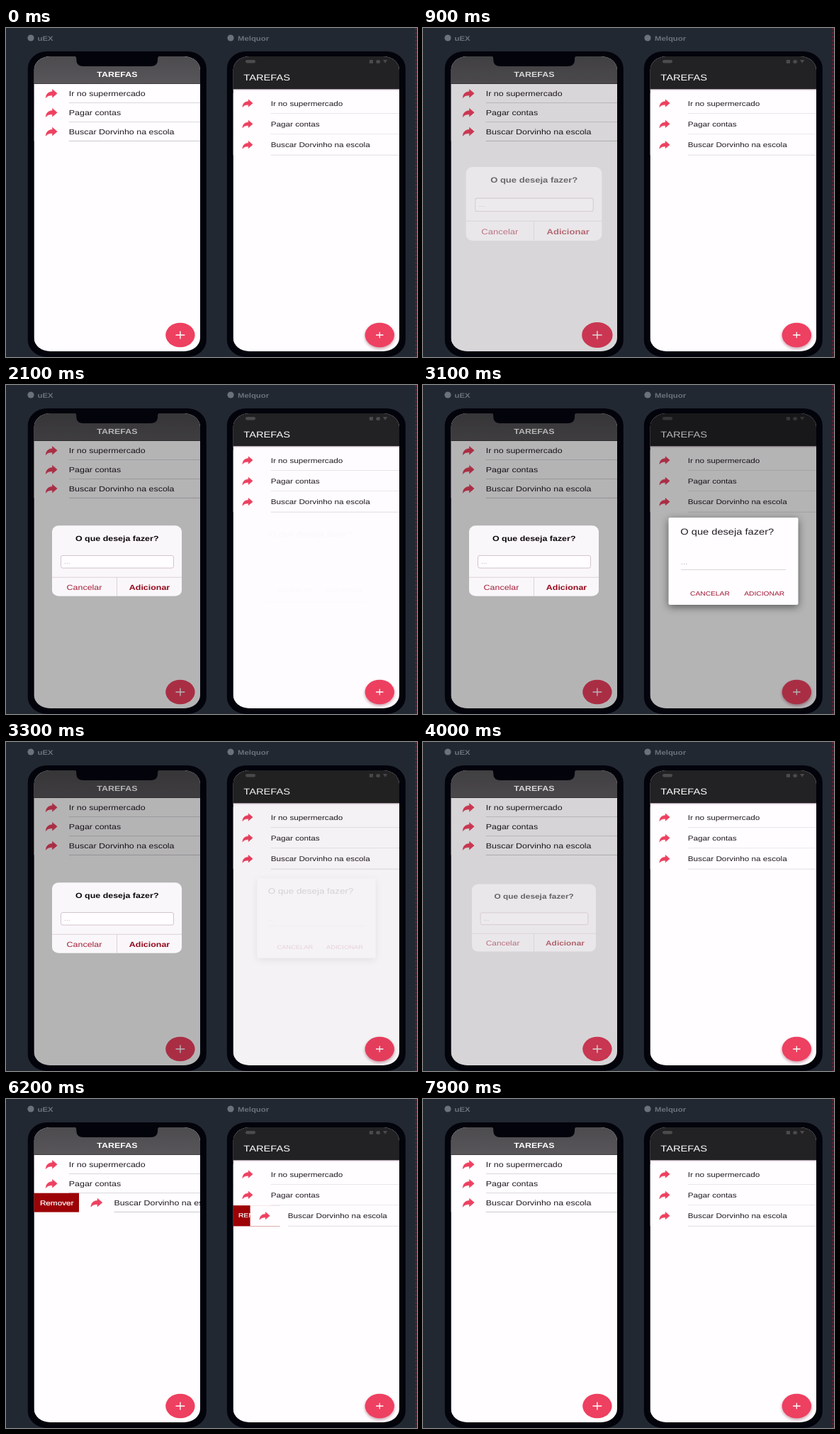
Animation, 580 px wide and 464 px high, one loop 8000 ms. Source, as an HTML page:

```html
<!DOCTYPE html>
<html lang="pt">
<head>
<meta charset="utf-8">
<style>
  html, body { margin: 0; width: 100%; height: 100%; overflow: hidden; background: #222831; }
  svg { display: block; width: 580px; height: 464px; }
  text { font-family: "Liberation Sans", Arial, sans-serif; text-rendering: geometricPrecision; }
</style>
</head>
<body>
<svg id="stage" viewBox="0 0 580 464"></svg>
<script>
const LOOP = 8000;
const SX = 0.732, SY = 0.61; // the whole screen is shown wider than tall
const RED = '#ee4060', DEEP = '#9c0206', INK = '#211a22';
const TASKS = ['Ir no supermercado', 'Pagar contas', 'Buscar Dorvinho na escola'];
const QUESTION = 'O que deseja fazer?';

const label = (x, y, str, size, fill, extra = '') =>
  `<text transform="translate(${x} ${y}) scale(${SX} ${SY})" font-size="${size}" fill="${fill}" ${extra}>${str}</text>`;
const rect = (x, y, w, h, fill, extra = '') =>
  `<rect x="${x}" y="${y}" width="${w}" height="${h}" fill="${fill}" ${extra}/>`;
const hline = (x1, x2, y, color) => rect(x1, y - 0.5, x2 - x1, 1, color);
const BOLD = 'font-weight="700"';
const MID = 'text-anchor="middle"';

const arrow = (x, y, k) =>
  `<path transform="translate(${x} ${y}) scale(${k})" fill="${RED}" stroke="${RED}" stroke-width=".6" stroke-linejoin="round"
    d="M.4 12.6C.6 7 4 3.7 9.8 3.5V.4L16.6 6.3L9.8 12.1V8.9C5.4 8.8 2.3 9.6.4 12.6Z"/>`;

const fab = (id, x, y, arm, width) =>
  `<g id="${id}" transform="translate(${x} ${y})"><ellipse rx="20.7" ry="17.2" fill="${RED}"/>
    <path d="M${-arm} 0H${arm}M0 ${-arm * 0.84}V${arm * 0.84}" stroke="#fff" stroke-width="${width}"/></g>`;

// One list entry; coordinates are relative to the left edge of the screen.
function row(i, o) {
  const y = o.top + i * o.step;
  return rect(0, y, 235, o.step - 0.2, '#fffdff') +
    arrow(o.iconX, y + o.iconY, o.iconK) +
    label(o.textX, y + o.base, TASKS[i], o.size, INK) +
    hline(o.textX, 235, y + o.step - 0.2, o.rule);
}

function list(id, o) {
  const y = o.top + 2 * o.step;
  return row(0, o) + row(1, o) +
    `<g id="${id}Option">${rect(0, y, o.open, o.step, DEEP)}${label(o.optX, y + o.optY, o.optText, o.optSize, '#fff', 'stroke="#fff" stroke-width=".35"')}</g>
     <g id="${id}Row">${row(2, o)}</g>`;
}

function phone(id, x, screen, over) {
  return rect(x - 8.7, 33, 252, 431, '#02030b', 'rx="27" ry="24"') +
    `<g transform="translate(${x} 0)"><g clip-path="url(#screen)">${rect(0, 40, 234.5, 416, '#fffdff')}${screen}
      <rect id="${id}Dim" y="40" width="235" height="416" fill="#000"/></g>${over}</g>`;
}

const leftList = { top: 79, step: 26.85, iconX: 16.4, iconY: 7.2, iconK: 0.98, textX: 49.3, base: 17.2, size: 17,
  rule: '#cbc8cd', open: 63.6, optText: 'Remover', optSize: 16, optX: 8.4, optY: 17 };
const rightList = { top: 91.5, step: 29.3, iconX: 13, iconY: 9, iconK: 0.88, textX: 53.2, base: 18, size: 16,
  rule: '#e0dee1', open: 66, optText: 'REMOVER', optSize: 14, optX: 7.4, optY: 17.2 };

const leftScreen = rect(0, 40, 235, 39, 'url(#bar)') + hline(0, 235, 78.6, '#3c3a3e') +
  label(117.4, 69.2, 'TAREFAS', 17, '#fff', `${BOLD} ${MID}`) +
  list('left', leftList) + fab('leftFab', 206.4, 433, 6.4, 1.4);

const notch = '<path d="M57 39.5C59 40 59.8 41 59.8 43V45Q59.8 54 70 54H164Q174.6 54 174.6 45V43C174.6 41 175.4 40 177.5 39.5Z" fill="#02030b"/>';

const rightScreen = rect(0, 40, 235, 46.6, '#222224') + hline(0, 235, 87, '#d9c6d3') + hline(0, 235, 88, '#f3ebf1') +
  rect(17.5, 45, 14, 4.6, '#4b4b4e', 'rx="2.3"') +
  rect(192.3, 45, 5.2, 4.8, '#4b4b4e') +
  '<ellipse cx="204.6" cy="47.4" rx="2.9" ry="2.5" fill="#4b4b4e"/><path d="M211.5 45H217.7L214.6 49.8Z" fill="#4b4b4e"/>' +
  label(14.8, 74, 'TAREFAS', 20, '#fff') +
  list('right', rightList) +
  '<ellipse cx="206.8" cy="435" rx="20.5" ry="17" fill="#7a1030" opacity=".45" filter="url(#soft)"/>' +
  fab('rightFab', 206.8, 433, 5.2, 1.3);

const leftAlert = rect(65, 198.3, 183, 99.4, '#faf7fa', 'rx="9.5" ry="8"') +
  label(156.7, 219.7, QUESTION, 17, '#0c070b', `${BOLD} ${MID}`) +
  rect(77.5, 240.5, 159, 17.6, '#fffdff', 'rx="2.5" stroke="#d3c3cf"') +
  label(82, 252, '...', 14, '#b5aab3') +
  hline(65, 248, 271.2, '#dcd2da') + rect(156, 271.2, 1, 26.5, '#dcd2da') +
  label(110.5, 288.6, 'Cancelar', 17, '#a2203a', MID) +
  label(202.5, 288.6, 'Adicionar', 17, '#930a1c', `${BOLD} ${MID}`);

const rightAlert = rect(346.5, 190, 183, 123, '#000', 'opacity=".5" filter="url(#wide)"') +
  rect(346.5, 187, 183, 123, '#fffdff', 'rx="2"') +
  label(363.3, 210.6, QUESTION, 20, INK) +
  label(363.8, 253, '...', 16, '#b5aab3') + hline(364, 512, 260.5, '#dcd6db') +
  label(377, 296.5, 'CANCELAR', 14, '#9c1230') +
  label(453.2, 296.5, 'ADICIONAR', 14, '#9c1230');

document.getElementById('stage').innerHTML = `
  <defs>
    <clipPath id="screen"><rect y="40" width="234.5" height="416" rx="23" ry="19"/></clipPath>
    <linearGradient id="bar" x2="0" y2="1"><stop stop-color="#4c4b4e"/><stop offset="1" stop-color="#59565a"/></linearGradient>
    <filter id="soft" x="-50%" y="-50%" width="200%" height="200%"><feGaussianBlur stdDeviation="2"/></filter>
    <filter id="wide" x="-30%" y="-30%" width="160%" height="160%"><feGaussianBlur stdDeviation="6"/></filter>
  </defs>
  ${rect(0, 0, 580, 464, '#222831')}
  <path d="M578.5 0V464" stroke="#8c1433" stroke-width="1.4" stroke-dasharray="3 2.5"/>
  <circle cx="35" cy="14" r="4.6" fill="#6b727b"/>
  ${label(44.5, 18.4, 'uEX', 15.5, '#6b727b', BOLD)}
  <circle cx="317" cy="14" r="4.6" fill="#6b727b"/>
  ${label(327, 18.4, 'Melquor', 15.5, '#6b727b', BOLD)}
  ${phone('left', 39.5, leftScreen, notch)}
  ${phone('right', 320.5, rightScreen, '')}
  <g id="leftAlert">${leftAlert}</g>
  <g id="rightAlert">${rightAlert}</g>`;

const $ = id => document.getElementById(id);
const part = (t, a, b) => Math.min(1, Math.max(0, (t - a) / (b - a)));
const sine = p => (1 - Math.cos(Math.PI * p)) / 2;
const out = p => 1 - (1 - p) ** 3;

function setAlert(id, t, [a, b, c, d], from, cx, cy) {
  const enter = out(part(t, a, b)), leave = part(t, c, d);
  const scale = leave > 0 ? 1 - 0.1 * leave : from + (1 - from) * enter;
  const shown = enter * (1 - leave);
  const g = $(id + 'Alert');
  g.setAttribute('opacity', shown);
  g.setAttribute('transform', `translate(${cx} ${cy}) scale(${scale}) translate(${-cx} ${-cy})`);
  $(id + 'Dim').setAttribute('opacity', 0.29 * shown);
}

function setSlide(id, t, [a, b, c, d], width) {
  const x = width * (sine(part(t, a, b)) - sine(part(t, c, d)));
  $(id + 'Row').setAttribute('transform', `translate(${x} 0)`);
  $(id + 'Option').setAttribute('visibility', x > 0.05 ? 'visible' : 'hidden');
}

function draw(t) {
  setAlert('left', t, [850, 1080, 3910, 4115], 1.1, 156.5, 248);
  setAlert('right', t, [2100, 2350, 3130, 3330], 0.9, 438, 248.5);
  setSlide('left', t, [4500, 5080, 7200, 7580], leftList.open);
  setSlide('right', t, [5850, 6700, 6800, 7120], rightList.open);
  const press = 1 + 0.05 * (part(t, 700, 800) - part(t, 1200, 1300));
  $('leftFab').setAttribute('transform', `translate(206.4 433) scale(${press})`);
}

const start = performance.now();
function tick() {
  draw((performance.now() - start) % LOOP);
  requestAnimationFrame(tick);
}
tick();
</script>
</body>
</html>
```
